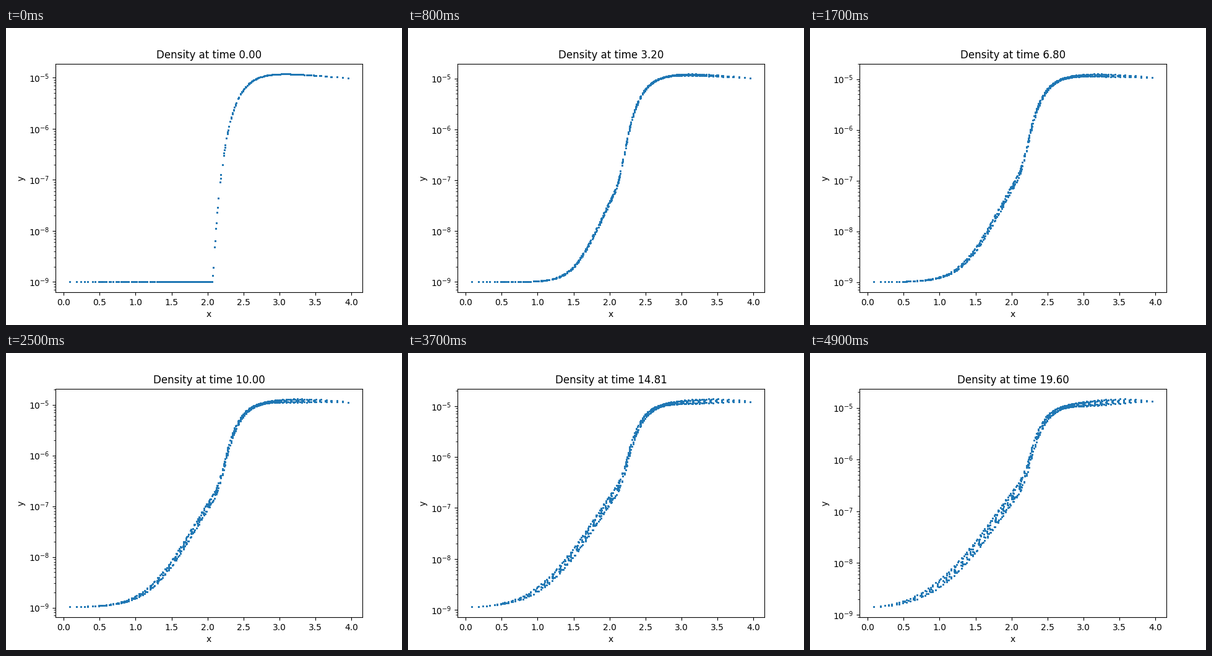
A matplotlib script that plays this animation: 640x480 px, repeating every 5 s.

```python
import numpy as np
import matplotlib.pyplot as plt
from matplotlib.animation import FuncAnimation

FRAMES = 50
SAVE_EVERY = 0.4
SOLVER_STEP = 0.0054814
END = 19.6
FLOOR = 1e-9

# Square grid of cells; only the distance from the centre is plotted.
axis = np.linspace(-2.8, 2.8, 50)
gx, gy = np.meshgrid(axis, axis)
radius = np.hypot(gx, gy).ravel()
swirl = np.sin(4 * np.arctan2(gy, gx)).ravel()


def inside(edge):
    """Near 1 within the edge, falling steeply to 0 beyond it."""
    return np.exp(-(radius / edge) ** 12)


def ease(u):
    u = np.clip(u, 0, 1)
    return u * u * (3 - 2 * u)


# Disc with a cavity: a 1/r profile cut off steeply within r = 2.5.
start = np.maximum(3.95e-5 / radius * np.exp(-(2.5 / radius) ** 12), FLOOR)

# Material leaking into the cavity; the centre fills later than the rim.
leak = FLOOR * 10 ** (0.88 * radius ** 1.62 - 0.4) * inside(2.4)
growth = np.maximum(3.9 - 1.5 * radius, 0.4)

# Rise towards the corners and spread with direction, both in decades.
rise = 0.125 * ease(radius - 2.9)
inner_spread = 0.14 * radius ** 2 / (0.4 + radius ** 2) * inside(2.5)
outer_spread = 0.08 * np.maximum(radius - 2.5, 0)
spread = (inner_spread + outer_spread) * swirl


def density(time):
    part = time / END
    base = start + leak * part ** growth
    filled = 1 - FLOOR / base
    return base * 10 ** (rise * part ** 1.3 + spread * filled * part ** 0.7)


def save_time(frame):
    """First solver step at or after the planned time."""
    return np.ceil(frame * SAVE_EVERY / SOLVER_STEP) * SOLVER_STEP


fig, ax = plt.subplots(figsize=(6.4, 4.8), dpi=100)


def draw(frame):
    time = save_time(frame)
    ax.clear()
    ax.plot(radius, density(time), "o", markersize=1, color="tab:blue")
    ax.set_yscale("log")
    ax.set_xlabel("x")
    ax.set_ylabel("y")
    ax.set_title(f"Density at time {time:.2f}")


anim = FuncAnimation(fig, draw, frames=FRAMES, interval=100,
                     repeat=True, repeat_delay=0)
plt.show()
```
